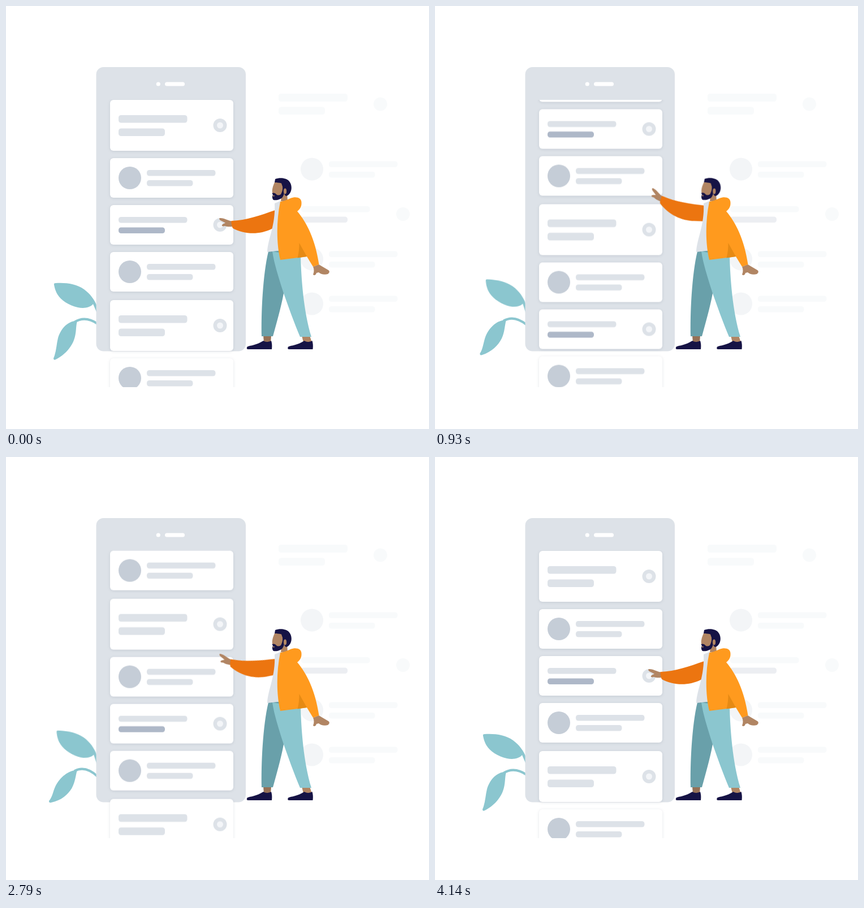
An HTML page without scripts that plays this animation: 748x748 px, repeating every 4170 ms.

```html
<!DOCTYPE html>
<html lang="en">
<head>
<meta charset="utf-8">
<title>Scrolling a phone list</title>
<style>
  :root {
    --loop: 4170ms;
    --ease: cubic-bezier(.333, 0, .667, 1);
    --grey: #dde2e8;
    --navy: #161345;
    --skin: #b18563;
    --teal: #8bc6cf;
  }
  html, body { margin: 0; width: 100%; height: 100%; overflow: hidden; background: #fff; }
  svg { display: block; width: 100vw; height: 100vh; }

  .grey { fill: var(--grey); }
  .navy { fill: var(--navy); }
  .skin { fill: var(--skin); }
  .teal { fill: var(--teal); }
  .white { fill: #fff; }
  .coat { fill: #ff9a1e; }
  .ghost { fill: #f8fafb; }
  .ghost-face { fill: #f3f5f7; }

  .list, .arm, .head, .leaf, .low-leaf, .low-stem {
    animation: var(--loop) var(--ease) infinite;
  }
  .list { animation-name: scroll; filter: drop-shadow(0 1px 2.5px rgba(40, 55, 80, .13)); }
  .arm { animation-name: swipe; transform-origin: 494px 364px; }
  .head { animation-name: nod; transform-origin: 491px 344px; }
  .leaf { animation-name: sway; transform-origin: 160px 540px; }
  .low-leaf { animation-name: low-leaf; }
  .low-stem { animation-name: low-stem; fill: none; stroke: var(--teal); stroke-width: 4.2; }

  @keyframes scroll {
    0%, 2.7% { transform: translateY(0); }
    16.4%, 59.7% { transform: translateY(-169.5px); }
    73.4%, 100% { transform: translateY(-354px); }
  }
  @keyframes swipe {
    0%, 2.4% { transform: rotate(0); }
    15.8%, 38.1% { transform: rotate(26.5deg); }
    59.5%, 60.1% { transform: rotate(0); }
    73.7% { transform: rotate(26.5deg); }
    98.6%, 100% { transform: rotate(0); }
  }
  @keyframes nod {
    0%, 16.8% { transform: rotate(0); }
    31%, 38.4% { transform: rotate(3.5deg); }
    52.8%, 100% { transform: rotate(0); }
  }
  @keyframes sway {
    0%, 45%, 100% { transform: rotate(0); }
    21%, 71% { transform: rotate(5.5deg); }
  }
  @keyframes low-leaf {
    0%, 100% { d: path("M126 557C110 556 97 570 92 587C89 599 89 612 84 623Q84 627 88 625C104 617 115 604 120 591C125 578 123 567 126 557Z"); }
    50% { d: path("M126 552C110 554 95 565 86 580C80 591 80 597 73 603Q73 607 77 606C96 604 107 595 115 584C122 572 123 562 126 552Z"); }
  }
  @keyframes low-stem {
    0%, 100% { d: path("M121 559Q140 547 162 562"); }
    50% { d: path("M121 554Q140 544 162 566"); }
  }
</style>
</head>
<body>
<svg viewBox="0 0 748 748" aria-hidden="true">
  <defs>
    <clipPath id="screen"><rect x="176" y="165.5" width="234" height="508.5"/></clipPath>
    <g id="ring">
      <circle r="12" class="grey"/>
      <circle r="5.5" fill="#f3f5f8"/>
    </g>
    <g id="tall">
      <rect x="184" width="218" height="90" rx="6" class="white"/>
      <rect x="199" y="27" width="121.5" height="13.5" rx="4.5" class="grey"/>
      <rect x="199" y="50.5" width="82" height="13.5" rx="4.5" class="grey"/>
      <use href="#ring" x="378.5" y="45"/>
    </g>
    <g id="contact">
      <rect x="184" width="218" height="70" rx="6" class="white"/>
      <circle cx="219" cy="35" r="20" fill="#c5cdd7"/>
      <rect x="249" y="21" width="121.5" height="10.5" rx="4.5" class="grey"/>
      <rect x="249" y="39" width="81.5" height="10.5" rx="4.5" class="grey"/>
    </g>
    <g id="marked">
      <rect x="184" width="218" height="70" rx="6" class="white"/>
      <rect x="199" y="21" width="121.5" height="10.5" rx="4.5" class="grey"/>
      <rect x="199" y="39.5" width="82" height="10.5" rx="4.5" fill="#aeb8c8"/>
      <use href="#ring" x="378.5" y="35"/>
    </g>
    <g id="set">
      <use href="#tall"/>
      <use href="#contact" y="103"/>
      <use href="#marked" y="186"/>
      <use href="#contact" y="269"/>
    </g>
    <g id="ghost-row" class="ghost">
      <circle cx="541" cy="14" r="20" class="ghost-face"/>
      <rect x="571" width="121.5" height="10.5" rx="4.5"/>
      <rect x="571" y="18.5" width="81.5" height="10.5" rx="4.5"/>
    </g>
    <path id="shoe" class="navy" d="M426 604C426 602 430 601 436 600C444 598 450 595 455 592C460 595 465 594 469 592Q471 598 470 607H428Q425 607 426 604Z"/>
  </defs>

  <!-- faded list behind -->
  <g class="ghost">
    <rect x="482" y="155" width="122" height="14" rx="4.5"/>
    <rect x="482" y="178.5" width="82" height="13.5" rx="4.5"/>
    <circle cx="662" cy="173.5" r="12"/>
    <rect x="522" y="354" width="121.5" height="10.5" rx="4.5"/>
    <rect x="522" y="372.5" width="82" height="10.5" rx="4.5" fill="#eceef2"/>
    <circle cx="702" cy="368" r="12"/>
    <use href="#ghost-row" y="274.5"/>
    <use href="#ghost-row" y="433.5"/>
    <use href="#ghost-row" y="512.5"/>
  </g>

  <!-- plant -->
  <path class="leaf teal" d="M85 493Q84 490 88 490C106 489 124 491 138 501C149 509 157 520 161 531L163 548L154 527C148 534 137 535 127 533C112 530 97 520 91 510C87 503 86 498 85 493Z"/>
  <path class="low-stem" d="M121 559Q140 547 162 562"/>
  <path class="low-leaf teal" d="M126 557C110 556 97 570 92 587C89 599 89 612 84 623Q84 627 88 625C104 617 115 604 120 591C125 578 123 567 126 557Z"/>

  <!-- phone -->
  <rect x="159.5" y="108" width="264.5" height="502.5" rx="13" class="grey"/>
  <circle cx="269.3" cy="138" r="3.6" class="white"/>
  <rect x="281" y="134.5" width="35" height="7" rx="3.5" class="white"/>
  <g clip-path="url(#screen)">
    <g class="list">
      <use href="#set" y="166"/>
      <use href="#set" y="520"/>
      <use href="#set" y="874"/>
    </g>
  </g>

  <!-- legs -->
  <path fill="#967156" d="M455 583H469L468 595H456Z"/>
  <path class="skin" d="M523 583H537L541 595H526Z"/>
  <use href="#shoe"/>
  <use href="#shoe" x="72.5"/>
  <path fill="#69a0aa" d="M464 434L484 432L491 508C486 535 477 565 472 584H452C451 545 454 475 464 434Z"/>
  <path class="teal" d="M471 434L521 442C522 480 526 540 540 585H520C509 559 498 528 490 505C482 480 474 455 471 434Z"/>

  <!-- reaching arm -->
  <g class="arm">
    <path class="skin" d="M402 381C393 380 387 375 379 375C376 375 377 378 380 379.500L388 383.500L383 386C380 389 383 390 387 389C392 391 397 390 402 390Z"/>
    <path fill="#ec7510" d="M398.500 380C425 379 450 370 476 361L490 358L492 384L470 394C446 406 420 403 401 393Q398 386 398.500 380Z"/>
  </g>

  <!-- head -->
  <path class="skin" d="M487 334L497 330L498 346H486Z"/>
  <g class="head">
    <path class="skin" d="M475 312L490 312L492 322L490 337L474 339L471 330C470 325 472 318 475 312Z"/>
    <path class="navy" d="M476 306C484 303 495 304 500 309C506 315 506 325 502 331C500 334 498 335.500 495 336C491 333 491 328 490 322L487 313.500C483 312 479 313 475 312Z"/>
    <path class="navy" d="M488.500 315C490 322 489 328 486 333C483 335 480 335 478 333C476 330 472 330 470.500 331L472 334C470 337 471 341 473 343C479 344 486 342 489 338C491 335 493 330 493 320Z"/>
    <ellipse cx="493.500" cy="327.500" rx="2.600" ry="5" class="skin"/>
    <ellipse cx="473.300" cy="335.800" rx="1.600" ry="1" class="skin"/>
  </g>

  <!-- torso -->
  <path class="grey" d="M475 349L485 345H492L490 432L462 435C463 411 477 388 475 349Z"/>
  <path class="skin" d="M543 461L553 457L570 467C573 469 572 472 569 474C563 476 556 474 553 471L549 472C548 476 545 477 543 475C545 470 545 465 543 461Z"/>
  <path class="coat" d="M485 346C492 345 498 342 503 340C513 336 523 339 522.500 348C523 355 519 360 515 363C532 383 547 413 553.500 457L543 461L532 443L485 449C479 424 477 385 485 346Z"/>
  <path fill="#e68a14" d="M518.500 419L532 443L515.500 445.500C518 436 518.500 428 518.500 419Z"/>
</svg>
</body>
</html>
```
